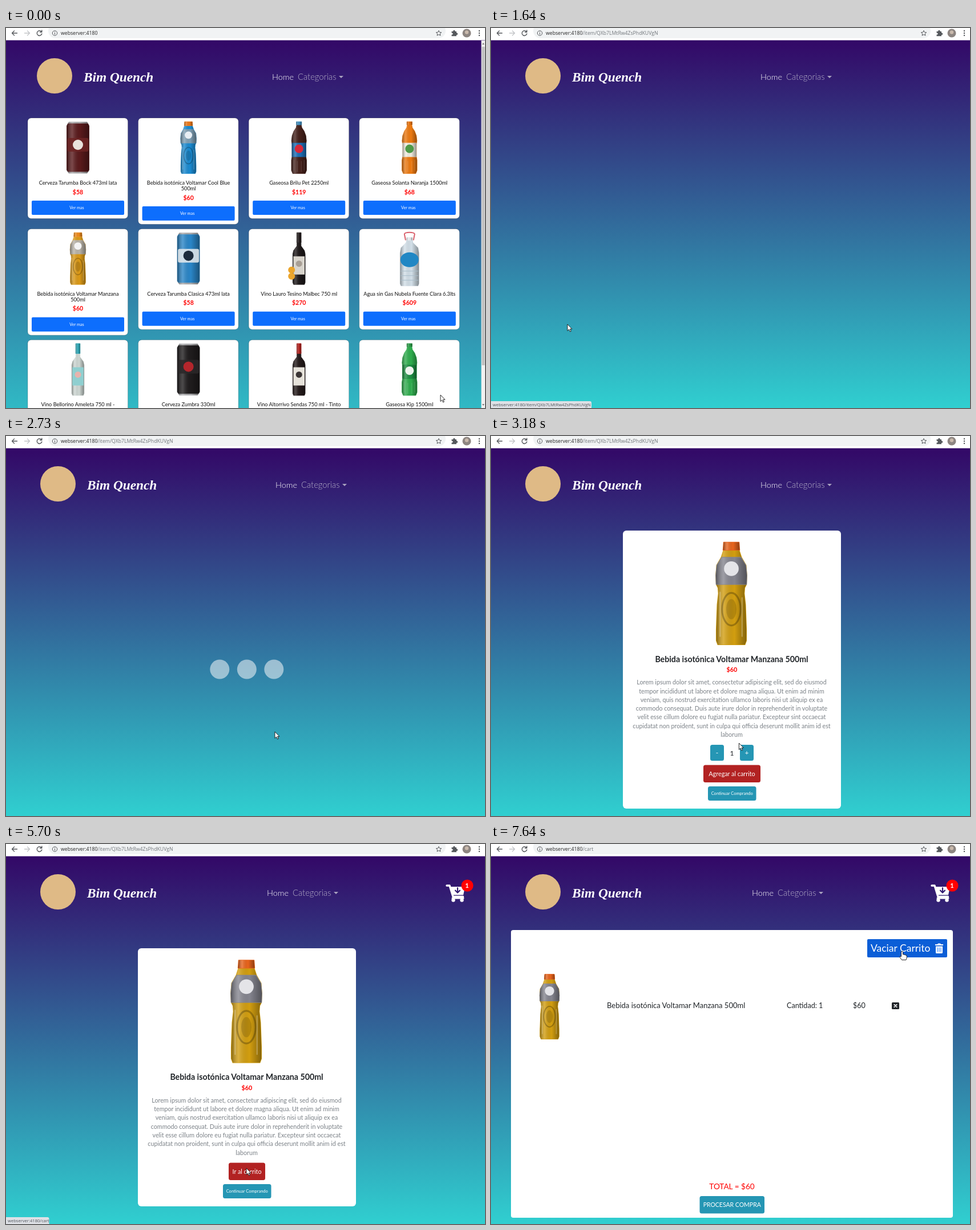
Write an HTML page that moves like this. It is 839 px wide and 667 px high and loops after 8000 ms.

```html
<!DOCTYPE html>
<html lang="es">
<head>
<meta charset="utf-8">
<title>Tienda de bebidas</title>
<style>
  html, body { margin: 0; width: 100%; height: 100%; overflow: hidden; background: #fff; }
  svg { display: block; width: 100%; height: 100%; font-family: Lato, "Open Sans", sans-serif; }
  .ui { font-family: "Open Sans", "Noto Sans", sans-serif; }
  .brand { font: italic bold 23.3px "Liberation Serif", "Noto Serif", serif; }
</style>
</head>
<body>
<svg id="stage" viewBox="0 0 839 667" xmlns="http://www.w3.org/2000/svg"></svg>
<script>
const LOOP = 8000;
const HOST = 'webserver:4180';
const ITEM_PATH = '/item/QXb7LMtRw4ZsPhdKUVgN';
const DRINK = 'Bebida isotónica Voltamar Manzana';
const BLUE = '#0d6efd', BLUE_HOVER = '#0b5ed7', TEAL = '#2596b4', RED = '#b22222', INK = '#212529';

const rect = (x, y, w, h, fill, r = 0, more = '') =>
  `<rect x="${x}" y="${y}" width="${w}" height="${h}" rx="${r}" fill="${fill}" ${more}/>`;
const circle = (x, y, r, fill, more = '') => `<circle cx="${x}" cy="${y}" r="${r}" fill="${fill}" ${more}/>`;
const oval = (x, y, rx, ry, fill, more = '') =>
  `<ellipse cx="${x}" cy="${y}" rx="${rx}" ry="${ry}" fill="${fill}" ${more}/>`;
const path = (d, fill, more = '') => `<path d="${d}" fill="${fill}" ${more}/>`;
const line = (d, color, width = 1) =>
  path(d, 'none', `stroke="${color}" stroke-width="${width}" stroke-linecap="round" stroke-linejoin="round"`);
const text = (x, y, s, size, fill, more = '') =>
  `<text x="${x}" y="${y}" font-size="${size}" fill="${fill}" ${more}>${s}</text>`;
const mid = (x, y, s, size, fill, weight = 400) =>
  text(x, y, s, size, fill, `text-anchor="middle" font-weight="${weight}"`);
const group = (id, body) => `<g id="${id}">${body}</g>`;

// Symmetric outline from [half width, y] pairs.
const outline = pts => 'M' + [...pts, ...pts.map(([w, y]) => [-w, y]).reverse()].join('L') + 'Z';
const solid = (pts, fill) => {
  const d = outline(pts);
  return path(d, fill, `stroke="${fill}" stroke-width=".8" stroke-linejoin="round"`) + path(d, 'url(#shade)');
};

// Drinks are 92 units tall and centred on x = 0.
const can = (body, label, mark) =>
  solid([[16, 1], [19.4, 7], [19.4, 86], [16, 91]], '#a9a9ab') +
  solid([[17.5, 4], [19.4, 8], [19.4, 85], [17.5, 88]], body) +
  rect(-18.5, 29, 37, 24, label, 3, 'opacity=".85"') + circle(0, 41, 9, mark);

const sport = (body, label, cap, mark) =>
  solid([[7, 8], [9, 14], [13, 21], [13.7, 30], [13.3, 38], [11.8, 41], [11.4, 46], [12.5, 56], [13.3, 78], [13.3, 88], [12, 91.5]], body) +
  solid([[8.5, 14], [12.8, 21], [13.7, 30], [13.4, 38]], label) +
  solid([[6.8, .5], [7.3, 7.5]], cap) +
  circle(0, 24, 6.5, mark) +
  oval(0, 60, 8.2, 14.5, 'none', 'stroke="#000" stroke-opacity=".25" stroke-width="1.6"') +
  oval(0, 60, 4.6, 9, '#000', 'opacity=".14"') +
  line('M-10 45V84M9.5 50V84', 'rgba(255,255,255,.25)', 1.2);

const soda = (body, label, cap, mark) =>
  solid([[4, 6], [5, 11], [9, 17], [12, 25], [13, 34], [12.2, 40], [12.2, 62], [13.2, 68], [13.2, 86], [11, 91.5]], body) +
  solid([[12.2, 38], [12.2, 62]], label) + solid([[4.6, .5], [4.6, 6]], cap) + circle(0, 48, 7.5, mark) +
  line('M-9 68V86M-3 70V88M4 70V88M9 68V86', 'rgba(255,255,255,.16)');

const wine = (body, label, cap, mark) =>
  solid([[3.4, 14], [3.7, 24], [9.5, 32], [10.8, 38], [10.8, 88], [9.5, 91.5]], body) +
  solid([[3.8, .5], [3.8, 18]], cap) + rect(-9.8, 42, 19.6, 32, label, .5) + circle(0, 55, 5.5, mark);

const water = () =>
  line('M-7 13L-9 3Q-8 0 0 0Q8 0 9 3L7 13', '#d9606c', 2) +
  solid([[5, 12], [6, 18], [15, 27], [16.5, 36], [16.5, 90], [15, 94]], '#d3e0e9') +
  solid([[5, 9], [5, 14]], '#e8eef2') +
  line('M-15 68H15M-15 76H15M-15 84H15', '#a8bdcb') + oval(0, 48, 16, 13, '#2187c4');

const apple = sport('#dc9a17', '#b9b3a8', '#ef8a1a', '#f4f4f4');
const gold = sport('#d29e10', '#85858f', '#e8641c', '#e4e4e8');
const place = (art, x, y, scale = 1) => `<g transform="translate(${x} ${y}) scale(${scale})">${art}</g>`;

const products = [
  [can('#5a1a1c', '#6d2424', '#e9e2dc'), ['Cerveza Tarumba Bock 473ml lata'], 58],
  [sport('#1a8bd2', '#7f9fb4', '#ee7a1a', '#e8eef4'), ['Bebida isotónica Voltamar Cool Blue', '500ml'], 60],
  [soda('#44201a', '#1b6fb8', '#3f8fc0', '#d9283a'), ['Gaseosa Brilu Pet 2250ml'], 119],
  [soda('#ee7a10', '#f2ede0', '#e87410', '#4e9a46'), ['Gaseosa Solanta Naranja 1500ml'], 68],
  [apple, [DRINK, '500ml'], 60],
  [can('#2a86c8', '#e8ecee', '#1d2b3c'), ['Cerveza Tarumba Clasica 473ml lata'], 58],
  [wine('#1d1819', '#d8d4cc', '#241d1e', '#a89f95') + circle(-13, 66, 6, '#eba52c') + circle(-13, 77, 6, '#eba52c'), ['Vino Lauro Tesino Malbec 750 ml'], 270],
  [water(), ['Agua sin Gas Nubela Fuente Clara 6.3lts'], 609],
  [wine('#cfd8d4', '#8fcfd0', '#2fa9b8', '#e7b3ad'), ['Vino Bellorino Ameleta 750 ml -', 'Blanco'], 320],
  [can('#1f1c1d', '#2b2728', '#b3262c'), ['Cerveza Zumbra 330ml'], 95],
  [wine('#241a1a', '#e6e2da', '#b3231f', '#3b3535'), ['Vino Altorrivo Sendas 750 ml - Tinto'], 350],
  [soda('#2fae4e', '#1d8f42', '#2c9a48', '#eef3ee'), ['Gaseosa Kip 1500ml'], 75],
];

function productCard([art, lines, price], i) {
  const x = 38 + (i % 4) * 193.6, y = 158 + Math.floor(i / 4) * 194.7, cx = x + 88;
  const extra = (lines.length - 1) * 10;
  const ring = i === 4 ? rect(x + 5.5, y + 153.5, 165, 28, '#8ab8fb', 3, 'id="ring"') : '';
  return rect(x, y, 175.5, 176.5 + extra, '#fff', 6, 'stroke="#000" stroke-opacity=".2"') +
    place(art, cx, y + 6) +
    lines.map((s, n) => mid(cx, y + 117 + n * 10, s, 9.2, '#111')).join('') +
    mid(cx, y + 133.5 + extra, '$' + price, 10.5, '#f00', 700) + ring +
    rect(x + 7, y + 145 + extra, 162, 25, BLUE, 2, `id="more${i}"`) +
    mid(cx - 2, y + 160 + extra, 'Ver mas', 7.3, '#fff');
}

const lorem = [
  'Lorem ipsum dolor sit amet, consectetur adipiscing elit, sed do eiusmod',
  'tempor incididunt ut labore et dolore magna aliqua. Ut enim ad minim',
  'veniam, quis nostrud exercitation ullamco laboris nisi ut aliquip ex ea',
  'commodo consequat. Duis aute irure dolor in reprehenderit in voluptate',
  'velit esse cillum dolore eu fugiat nulla pariatur. Excepteur sint occaecat',
  'cupidatat non proident, sunt in culpa qui officia deserunt mollit anim id est',
  'laborum',
];

const itemBody = () =>
  place(gold, 421, 203, 1.975) +
  mid(421.5, 414, DRINK + ' 500ml', 14.2, INK, 700) +
  mid(422, 431.5, '$60', 10.8, '#f00', 700) +
  lorem.map((s, i) => mid(421.5, 453.7 + i * 15.3, s, 10.7, '#7b8187')).join('');
const button = (x, y, w, h, label, size, fill) =>
  rect(x, y, w, h, fill, 3.5) + mid(x + w / 2, y + h / 2 + size * .35, label, size, '#fff');
const keepShopping = y => button(380, y, 84.5, 25, 'Continuar Comprando', 7.5, TEAL);

const itemBefore = rect(231, 166, 382, 488, '#fff', 6) +
  `<g transform="translate(0 -17.5)">${itemBody()}</g>` +
  button(384, 542, 24, 28, '-', 12, TEAL) + mid(422, 560.5, '1', 12, INK) + button(436, 542, 24, 28, '+', 12, TEAL) +
  button(372, 577.5, 100, 30.5, 'Agregar al carrito', 10.8, RED) + keepShopping(615);
const itemAfter = rect(231, 183, 382, 453, '#fff', 6) + itemBody() +
  button(390, 559.5, 64, 30.5, 'Ir al carrito', 10.8, RED) + keepShopping(597);

const cartPage = rect(35, 151, 774, 505, '#fff', 4) +
  rect(659, 167, 140, 32, BLUE, 2, 'id="empty"') + text(665, 189, 'Vaciar Carrito', 17.5, '#fff') +
  path('M778 176h4l1-1.5h4l1 1.5h4v2h-14zM779 179.500h12v11q0 1.500-1.500 1.500h-9q-1.500 0-1.500-1.500z', '#fff') +
  line('M782 182v7M785 182v7M788 182v7', BLUE, 1) +
  place(gold, 102.5, 228, 1.25) +
  text(203, 288, DRINK + ' 500ml', 13, INK) + text(518, 288, 'Cantidad: 1', 12.6, INK) + text(634, 288, '$60', 12.6, INK) +
  rect(702, 278, 13, 12, INK, 1.5) + line('M706.300 281.800l4.400 4.400m0-4.400l-4.400 4.400', '#fff', 1.7) +
  mid(422, 605.5, 'TOTAL = $60', 13.6, '#f00') +
  button(365.5, 618, 113.5, 30.5, 'PROCESAR COMPRA', 10.5, TEAL);

const cartIcon = line('M772 73h5l6 19.500h17.500', '#fff', 3.4) + path('M778 75h26l-3 14.500h-19z', '#fff') +
  line('M782 95h19', '#fff', 3) + circle(783.5, 98.5, 3.2, '#fff') + circle(798.5, 98.5, 3.2, '#fff') +
  line('M791 77v8m-4-3.500l4 4l4-4', '#321a70', 2.2) +
  circle(808, 73, 10.5, '#f00') + mid(807.5, 77, '1', 11, '#fff', 700);

const browserBar = rect(0, 0, 839, 21.5, '#fff') + rect(74, -8, 696, 26, '#f1f3f4', 13) +
  line('M19.500 9h-9m4-4l-4 4l4 4', '#55585c', 1.3) + line('M32.500 9h9m-4-4l4 4l-4 4', '#c3c5c8', 1.3) +
  line('M62 6.500a4.300 4.300 0 1 0 .8 3.500M62.800 4v3.200h-3.200', '#55585c', 1.4) +
  circle(85.5, 9, 4.2, 'none', 'stroke="#55585c"') + line('M85.500 8.800v2.200M85.500 6.800v.1', '#55585c', 1.1) +
  path('M758 4.500l1.400 3l3.300.3l-2.500 2.200l.8 3.200l-3-1.700l-3 1.700l.8-3.200l-2.500-2.200l3.300-.3z', 'none', 'stroke="#55585c"') +
  path('M780.500 6h2.800a1.700 1.700 0 1 1 3.200 0h2.500v2.700a1.700 1.700 0 1 1 0 3.200v2.300h-8.500v-2.600a1.600 1.600 0 1 0 0-3z', '#55585c') +
  circle(807, 9, 7.5, '#8d8581') + circle(807, 7.5, 3.2, '#c9b9ac') +
  [5, 9, 13].map(y => circle(829, y, 1.2, '#55585c')).join('') +
  `<text class="ui" x="96" y="12.300" font-size="8.700" fill="#222">${HOST}<tspan id="path" fill="#70757a"></tspan></text>`;

const gradient = (id, bottom) =>
  `<linearGradient id="${id}" gradientUnits="userSpaceOnUse" x1="0" y1="22" x2="0" y2="${bottom}">
  <stop stop-color="#330867"/><stop offset="1" stop-color="#30cfd0"/></linearGradient>`;

const stage = document.getElementById('stage');
stage.innerHTML = `<defs>${gradient('tall', 747)}${gradient('fit', 667)}
  <linearGradient id="shade"><stop stop-opacity=".38"/><stop offset=".25" stop-color="#fff" stop-opacity=".2"/>
  <stop offset=".6" stop-opacity="0"/><stop offset="1" stop-opacity=".38"/></linearGradient></defs>` +
  rect(0, 21, 839, 646, 'url(#fit)', 0, 'id="back"') +
  group('logo', circle(85, 84, 31, '#dfba86') + `<text class="brand" x="136" y="94" fill="#fff">Bim Quench</text>`) +
  group('menu', text(0, 91, 'Home', 14.5, '#fff', 'font-weight="300"') +
    text(45, 91, 'Categorias', 14.8, '#b5aec8', 'font-weight="300"') + path('M117 84h8l-4 4z', '#a9a2bf')) +
  group('home', products.map(productCard).join('') + rect(832.5, 22, 6.5, 645, '#f1f1f1') +
    rect(833.5, 33, 5, 559, '#c1c1c1') + path('M834 29l2-3l2 3zM834 660l2 3l2-3z', '#777')) +
  group('dots', [374.3, 421.8, 469.3].map(x => circle(x, 409.5, 17, '#f8f9fa')).join('')) +
  group('before', itemBefore) + group('after', itemAfter) + group('cartIcon', cartIcon) + group('cart', cartPage) +
  browserBar +
  group('status', rect(-4, 655, 180, 16, '#dee1e6', 3, 'id="statusBox"') +
    `<text id="statusText" class="ui" x="3" y="664" font-size="7.600" fill="#50545a"></text>`) +
  group('arrow', path('M0 0V11.500L2.700 9L4.500 13L6.400 12.200L4.600 8.300H8Z', '#fff', 'stroke="#111" stroke-width=".9"')) +
  group('hand', path('M-1.500 1.200Q0-.8 1.500 1.200V6Q3 5 4 6.500Q5.500 5.800 6.300 7.200Q8.300 6.800 8.300 9V12L7 15.500H-.5L-4 10.500Q-4.300 8.500-1.500 9.500Z', '#fff', 'stroke="#111" stroke-width=".9"'));

const el = id => document.getElementById(id);
const show = (id, on) => el(id).setAttribute('visibility', on ? 'visible' : 'hidden');
const move = (id, x, y) => el(id).setAttribute('transform', `translate(${x} ${y})`);
const fill = (id, color) => el(id).setAttribute('fill', color);
const clamp = v => Math.max(0, Math.min(1, v));

// [time, x, y] of the pointer, joined by straight moves.
const track = [
  [70, 761, 644], [280, 590, 480], [460, 400, 406], [640, 222, 480], [740, 216, 545], [820, 95, 545],
  [960, 118, 527], [1560, 118, 527], [1640, 133.5, 520], [2460, 446, 524], [2730, 471, 519],
  [3040, 440, 535], [3390, 426, 545], [3740, 421, 585], [5630, 421, 585], [5700, 421, 569],
  [6720, 421, 569], [7000, 566, 487], [7250, 711, 346], [7510, 726, 191], [7580, 720, 188],
];
function pointer(t) {
  const i = track.findIndex(k => k[0] > t);
  if (i <= 0) return (i ? track[track.length - 1] : track[0]).slice(1);
  const [a, b] = [track[i - 1], track[i]], p = (t - a[0]) / (b[0] - a[0]);
  return [1, 2].map(n => a[n] + (b[n] - a[n]) * p);
}

function render(t) {
  const within = (a, b) => t >= a && t < b;
  const home = t < 1630, inCart = t >= 6080, added = t >= 4000;

  fill('back', home ? 'url(#tall)' : 'url(#fit)');
  move('logo', home ? 0 : 6, 0);
  move('menu', home ? 466 : added ? 457 : 472, 0);
  show('home', home);
  show('ring', within(1480, 1630));
  fill('more4', t >= 950 ? BLUE_HOVER : BLUE);
  show('before', within(3000, 4000));
  show('after', within(4000, 6080));
  show('cartIcon', added);
  show('cart', inCart);
  fill('empty', t >= 7580 ? BLUE_HOVER : BLUE);

  // Loading dots grow to full size, then fade in place.
  const phase = (t - 2000) / 1000, size = clamp(phase * 2);
  show('dots', within(2000, 3000));
  el('dots').setAttribute('opacity', clamp(phase < .5 ? phase * 2 : 2 - phase * 2));
  document.querySelectorAll('#dots circle').forEach(c => c.setAttribute('r', 17 * size));

  el('path').textContent = t < 1490 ? '' : t < 6060 ? ITEM_PATH : '/cart';
  const cartLink = t > 3000;
  el('statusText').textContent = HOST + (cartLink ? '/cart' : ITEM_PATH);
  el('statusBox').setAttribute('width', cartLink ? 79.5 : 180);
  show('status', within(1020, 1990) || within(4130, 6630));
  el('status').setAttribute('opacity', clamp(((cartLink ? 6630 : 1990) - t) / 130));

  const [x, y] = pointer(t);
  const hand = within(950, 1490) || within(3600, 5670) || t >= 7570;
  show('hand', hand);
  show('arrow', !hand);
  move(hand ? 'hand' : 'arrow', x, y);
}

const start = performance.now();
function tick(now) {
  render(Math.max(0, now - start) % LOOP);
  requestAnimationFrame(tick);
}
render(0);
requestAnimationFrame(tick);
</script>
</body>
</html>
```
